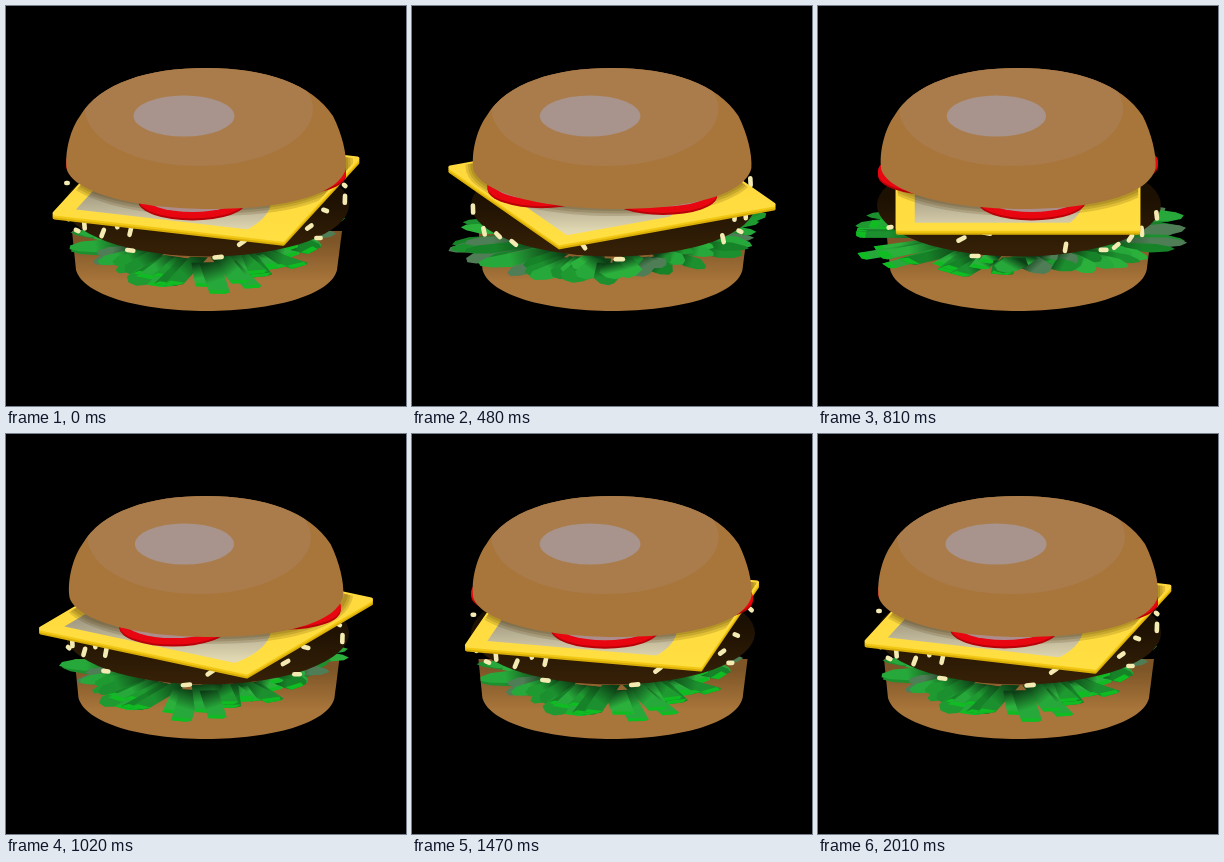
These frames come from a looping animation (400x400 px, 2.04 s). An HTML page with a canvas:

```html
<!DOCTYPE html>
<html>
<head>
<meta charset="utf-8">
<title>Spinning burger</title>
<style>
html, body { margin: 0; width: 100%; height: 100%; overflow: hidden; background: #000; }
canvas { display: block; width: 100vmin; height: 100vmin; }
</style>
</head>
<body>
<canvas id="stage" width="400" height="400"></canvas>
<script>
const ctx = document.getElementById('stage').getContext('2d');
const LOOP = 2040, STEP = 30, RAD = Math.PI / 180, TILT = 0.355;

// Spin keys: time in ms, angle in degrees, speed in degrees per ms
const KEYS = [[0, 0, 0.02], [240, 39, 0.3], [480, 135, 0.46], [810, 288, 0.37],
  [1080, 356, 0.12], [1290, 367, 0], [1680, 360.5, -0.006], [2040, 360, 0]];

// Sesame seeds: angle, height, lean
const SEEDS = [[151, 195, 80], [138, 194, 120], [130, 180, 75], [123, 184, 105], [75, 189, 145],
  [85, 202, 175], [123, 203, 5], [158, 206, 10], [172, 203, 70], [42, 188, 155], [-2, 195, 100],
  [4, 176, 10], [59, 185, 20], [31, 179, 10], [36, 203, 0], [-20, 205, 0], [-27, 205, 150],
  [-36, 203, 140], [-45, 203, 80], [-68, 206, 60], [-80, 201, 30], [-90, 202, 30],
  [237, 191, 55], [222, 204, 0], [163, 187, 100], [180, 177, 0]];

let seed = 11;
const rnd = () => (seed = seed * 16807 % 2147483647) / 2147483647;
const GREENS = ['#1f9a31', '#27a83a', '#178328', '#2bb03c', '#1c8f2e', '#4f7d55'];
const leaves = Array.from({ length: 84 }, (_, i) => {
  const a = (i * 137.5) % 360;
  const reach = 153 - 22 * Math.cos(2 * (a - 15) * RAD);
  const strip = a > 25 && a < 118;
  return {
    a, strip,
    out: reach * (0.8 + 0.22 * rnd()),
    half: strip ? 9 + 4 * rnd() : 12 + 6 * rnd(),
    skew: (rnd() - 0.5) * 50,
    h: 220 + 8 * rnd(),
    color: GREENS[Math.floor(rnd() * GREENS.length)]
  };
});

function spin(t) {
  const i = KEYS.findIndex(k => k[0] > t);
  const [t0, p0, v0] = KEYS[i - 1], [t1, p1, v1] = KEYS[i];
  const d = t1 - t0, u = (t - t0) / d, w = 1 - u;
  return p0 * (1 + 2 * u) * w * w + v0 * d * u * w * w + p1 * u * u * (3 - 2 * u) - v1 * d * u * u * w;
}

const project = (a, r, h) => [200 + r * Math.cos(a * RAD), h + TILT * r * Math.sin(a * RAD)];

function fill(path, color) {
  ctx.fillStyle = color;
  ctx.fill(path);
}

function poly(points) {
  const p = new Path2D();
  points.forEach(q => p.lineTo(...q));
  p.closePath();
  return p;
}

function oval(x, y, rx, ry) {
  const p = new Path2D();
  p.ellipse(x, y, rx, ry, 0, 0, 7);
  return p;
}

function fade(y0, c0, y1, c1) {
  const g = ctx.createLinearGradient(0, y0, 0, y1);
  g.addColorStop(0, c0);
  g.addColorStop(1, c1);
  return g;
}

function widen(k, draw) {
  ctx.save();
  ctx.translate(200, 0);
  ctx.scale(k, 1);
  ctx.translate(-200, 0);
  draw();
  ctx.restore();
}

const BASE = new Path2D('M66 225L70 264C77 289 134 305 200 305C267 305 325 289 331 264L336 225Z');
const TOP = new Path2D('M61 164C58 146 65 122 74 110C94 77 142 62 200 62C260 62 306 78 327 110C336 128 341 148 340 162C334 188 281 203 205 203C130 203 69 187 61 164Z');

function bottomBun() {
  fill(BASE, fade(235, '#7d5527', 275, '#a8753b'));
}

function topBun() {
  fill(TOP, '#a8753b');
  ctx.save();
  ctx.clip(TOP);
  fill(oval(193, 103, 114, 57), '#aa7c4b');
  ctx.restore();
  fill(oval(178, 110, 50.5, 20.5), '#a8948c');
}

function lettuce(rot) {
  const sorted = leaves.map(l => ({ ...l, s: Math.sin((l.a - rot) * RAD) })).sort((p, q) => p.s - q.s);
  for (const l of sorted) {
    if (l.s < -0.45) continue;
    const a = l.a - rot;
    const [x0, y0] = project(a, 82, l.h);
    const at = (across, r) => {
      const b = a + l.skew * (r - 82) / 300;
      const [x, y] = project(b, r, l.h);
      return [x - across * Math.sin(b * RAD), y + across * TILT * Math.cos(b * RAD)];
    };
    const w = l.half, o = l.out;
    const shape = l.strip
      ? [at(-w, 82), at(-w, o - 3), at(-w * 0.5, o), at(w, o - 2), at(w, 82)]
      : [at(-w * 0.6, 82), at(-w, o - 22), at(-w * 0.5, o - 6), at(0, o), at(w * 0.6, o - 5), at(w, o - 20), at(w * 0.6, 82)];
    const tip = at(0, o);
    const g = ctx.createLinearGradient(x0, y0, ...tip);
    g.addColorStop(0, '#0d3f16');
    g.addColorStop(0.6, l.color);
    g.addColorStop(1, l.color);
    fill(poly(shape), g);
    if (l.strip) fill(poly([at(-w, o - 8), at(-w * 0.5, o), at(w, o - 2), at(w * 0.8, o - 11)]), '#0fbd22');
  }
}

function patty(rot) {
  fill(oval(201, 199, 142, 51.5), fade(190, '#1c1002', 245, '#352007'));
  ctx.strokeStyle = '#f3ebb2';
  ctx.lineCap = 'round';
  ctx.lineWidth = 4.6;
  for (const [a0, h, lean] of SEEDS) {
    const a = a0 - rot, face = Math.sin(a * RAD);
    if (face < -0.1) continue;
    const [x, y] = project(a, 139, h);
    const dx = 3.6 * Math.cos(lean * RAD) * Math.max(0.2, face), dy = 3.6 * Math.sin(lean * RAD);
    ctx.beginPath();
    ctx.moveTo(x - dx, y - dy);
    ctx.lineTo(x + dx, y + dy);
    ctx.stroke();
  }
}

function cheese(rot) {
  const square = (r, h) => poly([63, 153, 243, 333].map(a => project(a - rot, r, h)));
  ctx.lineJoin = 'round';
  ctx.lineWidth = 4;
  for (const [h, color] of [[184, '#d9ae08'], [182, '#f2c814'], [180, fade(150, '#ffd83c', 235, '#ffdf42')]]) {
    const p = square(170, h);
    ctx.strokeStyle = color;
    ctx.stroke(p);
    fill(p, color);
  }
  ctx.save();
  ctx.clip(square(146, 180));
  fill(oval(160, 195, 105, 45), fade(188, '#a49c83', 226, '#e2d9b4'));
  ctx.restore();
  // soft contact shadow below the top bun
  ctx.save();
  ctx.clip(square(170, 180));
  ctx.strokeStyle = 'rgba(70,48,0,.16)';
  for (const w of [4, 9, 14]) {
    ctx.lineWidth = w;
    ctx.stroke(TOP);
  }
  ctx.restore();
}

function tomatoes(rot) {
  const slices = [99, 189, 279, 9].map(a => project(a - rot, 87, 160)).sort((p, q) => p[1] - q[1]);
  for (const [x, y] of slices) {
    for (let d = 5; d >= 0; d--) fill(oval(x, y + d, 54, 19), d > 3 ? '#b80008' : '#e80610');
    fill(oval(x, y, 48, 15.5), '#ad8d8b');
  }
}

function draw(t) {
  const rot = spin(t);
  const wide = 1 - 0.02 * Math.exp(-(((t - 950) / 380) ** 2));
  ctx.fillStyle = '#000';
  ctx.fillRect(0, 0, 400, 400);
  widen(wide, bottomBun);
  lettuce(rot);
  patty(rot);
  cheese(rot);
  tomatoes(rot);
  widen(wide, topBun);
}

const start = performance.now();
function tick() {
  const t = Math.max(0, performance.now() - start) % LOOP;
  draw(Math.floor(t / STEP) * STEP);
  requestAnimationFrame(tick);
}
tick();
</script>
</body>
</html>
```
